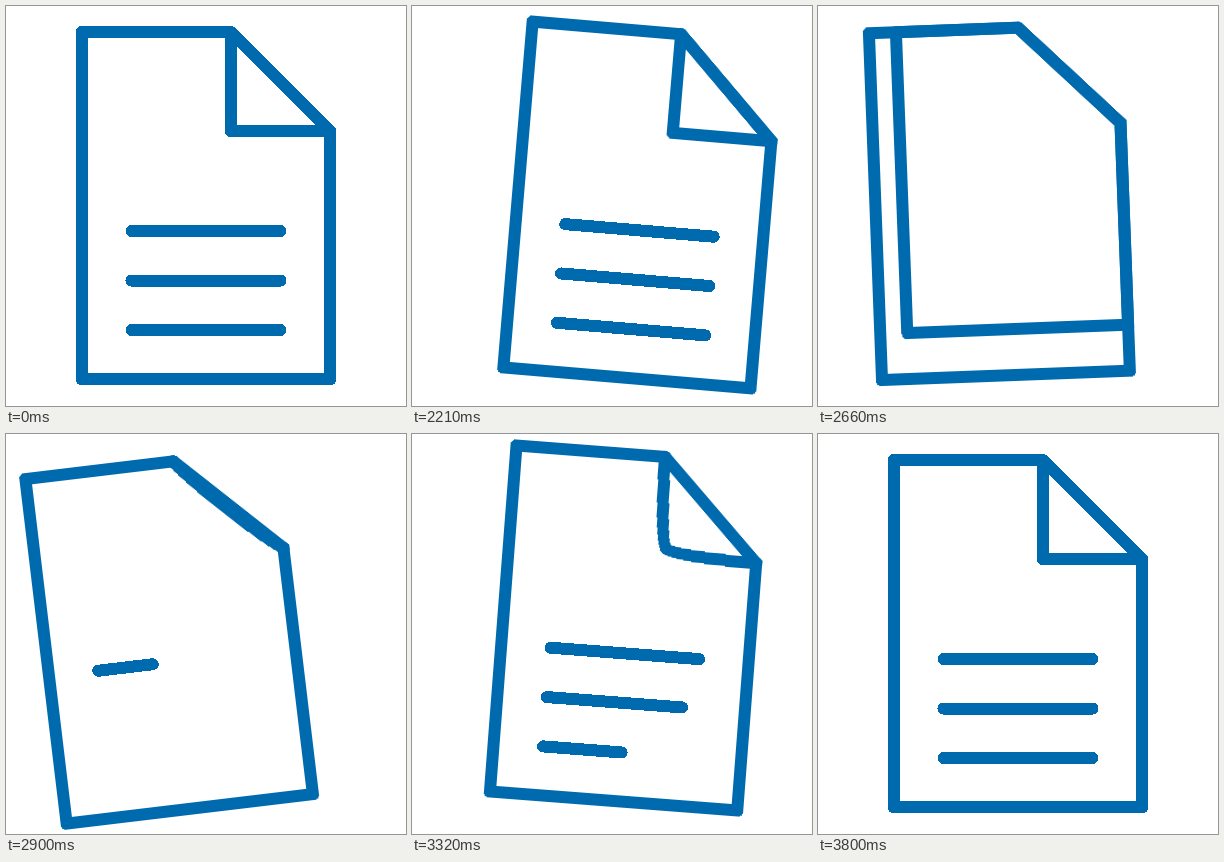
Recreate the animation shown at these times as an HTML page. Size 400 px wide and 400 px high, loop 3.83 s.

```html
<!DOCTYPE html>
<html lang="en">
<head>
<meta charset="utf-8">
<title>Turning page</title>
<style>
  html, body { margin: 0; width: 100%; height: 100%; overflow: hidden; background: #fff; }
  svg { display: block; width: 100%; height: 100%; shape-rendering: crispEdges; }
  #page {
    fill: none; stroke: #006aae; stroke-width: 12;
    stroke-linecap: round; stroke-linejoin: round;
    transform-origin: 200px 199.7px;
  }
  .line { stroke-dasharray: 1 2; }
  #flap { fill: #fff; }
</style>
</head>
<body>
<svg viewBox="0 0 400 400">
  <g id="lift">
    <g id="page">
      <path class="line" pathLength="1" d="M125.5 225H274.5"/>
      <path class="line" pathLength="1" d="M125.5 274.5H274.5"/>
      <path class="line" pathLength="1" d="M125.5 324H274.5"/>
      <path id="flap"/>
      <path id="curl"/>
      <path d="M75.6 26H225L324.4 125.4V373.4H75.6Z"/>
    </g>
  </g>
</svg>
<script>
const LOOP = 3830, START = 2030, STEP = 30;
const TURNED = 2775;  // the flap covers the whole page
const smooth = 'cubic-bezier(.33,0,.67,1)';
const clips = [];

// keys: [ms, value, easing to the next key]
function track(el, prop, keys) {
  const frames = keys.map(([ms, value, easing = 'linear']) =>
    ({ offset: ms / LOOP, [prop]: value, easing }));
  const clip = el.animate(frames, { duration: LOOP, fill: 'both' });
  clip.pause();
  clips.push(clip);
}

const $ = id => document.getElementById(id);

// Fold corner slides from its place (p = 0) to the bottom left (p = 1)
function flap(p) {
  const x = 225 - 149.4 * p, y = 125.4 + 248 * p;
  return `path("M${x} 26L${x} ${y}L324.4 ${y}L324.4 125.4L225 26Z")`;
}

// Straight diagonal (t = 0) bends into a sharp corner (t = 1)
function curl(t) {
  const x = 274.7 - 49.7 * t, y = 75.7 + 49.7 * t, h = 44 * (1 - t);
  return `path("M225 26C225 26 ${x - h} ${y - h} ${x} ${y}` +
    `C${x + h} ${y + h} 324.4 125.4 324.4 125.4")`;
}

track($('page'), 'translate', [
  [0, '0px'], [2000, '0px', smooth], [2400, '55px', 'cubic-bezier(.3,0,.45,1)'],
  [2830, '-38px', 'cubic-bezier(.53,0,.62,1)'], [3370, '16px', 'cubic-bezier(.3,0,.5,1)'],
  [3800, '0px'], [LOOP, '0px']
]);
track($('page'), 'rotate', [
  [0, '0deg'], [2000, '0deg', smooth], [2400, '9deg', 'cubic-bezier(.33,0,.6,1)'],
  [2830, '-7deg', 'cubic-bezier(.65,0,.7,1)'], [3370, '4.8deg', 'ease-in-out'],
  [3800, '0deg'], [LOOP, '0deg']
]);
track($('lift'), 'translate', [
  [0, '0px 0px'], [2000, '0px 0px', smooth], [2420, '0px -1px', 'ease-in-out'],
  [2560, '0px -5.5px', 'ease-in-out'], [2860, '0px 3px', 'ease-in-out'],
  [3050, '0px 3.8px', 'ease-in-out'], [3370, '0px -6px', 'ease-in-out'],
  [3800, '0px 0px'], [LOOP, '0px 0px']
]);

track($('flap'), 'd', [[0, flap(0)], [2390, flap(0), 'ease-in-out'], [TURNED, flap(1)], [LOOP, flap(1)]]);
track($('flap'), 'opacity', [[0, 1], [TURNED, 1], [TURNED, 0], [LOOP, 0]]);
track($('curl'), 'd', [[0, curl(0)], [2780, curl(0), 'ease-in-out'], [3530, curl(1)], [LOOP, curl(1)]]);
track($('curl'), 'opacity', [[0, 0], [TURNED, 0], [TURNED, 1], [LOOP, 1]]);

// Lines go with the old page, then are written one after another
document.querySelectorAll('.line').forEach((line, i) => {
  const from = [2781, 2950, 3141][i];
  track(line, 'strokeDashoffset', [
    [0, 0], [TURNED, 0], [TURNED, 1.1], [from, 1.1],
    [from, 1, 'ease-out'], [from + 490, 0], [LOOP, 0]
  ]);
});

// Motion advances in 30 ms steps after the opening hold
function draw() {
  const t = performance.now() % LOOP;
  const time = t < START ? 0 : START + Math.floor((t - START) / STEP) * STEP;
  for (const clip of clips) clip.currentTime = time;
  requestAnimationFrame(draw);
}
draw();
</script>
</body>
</html>
```
